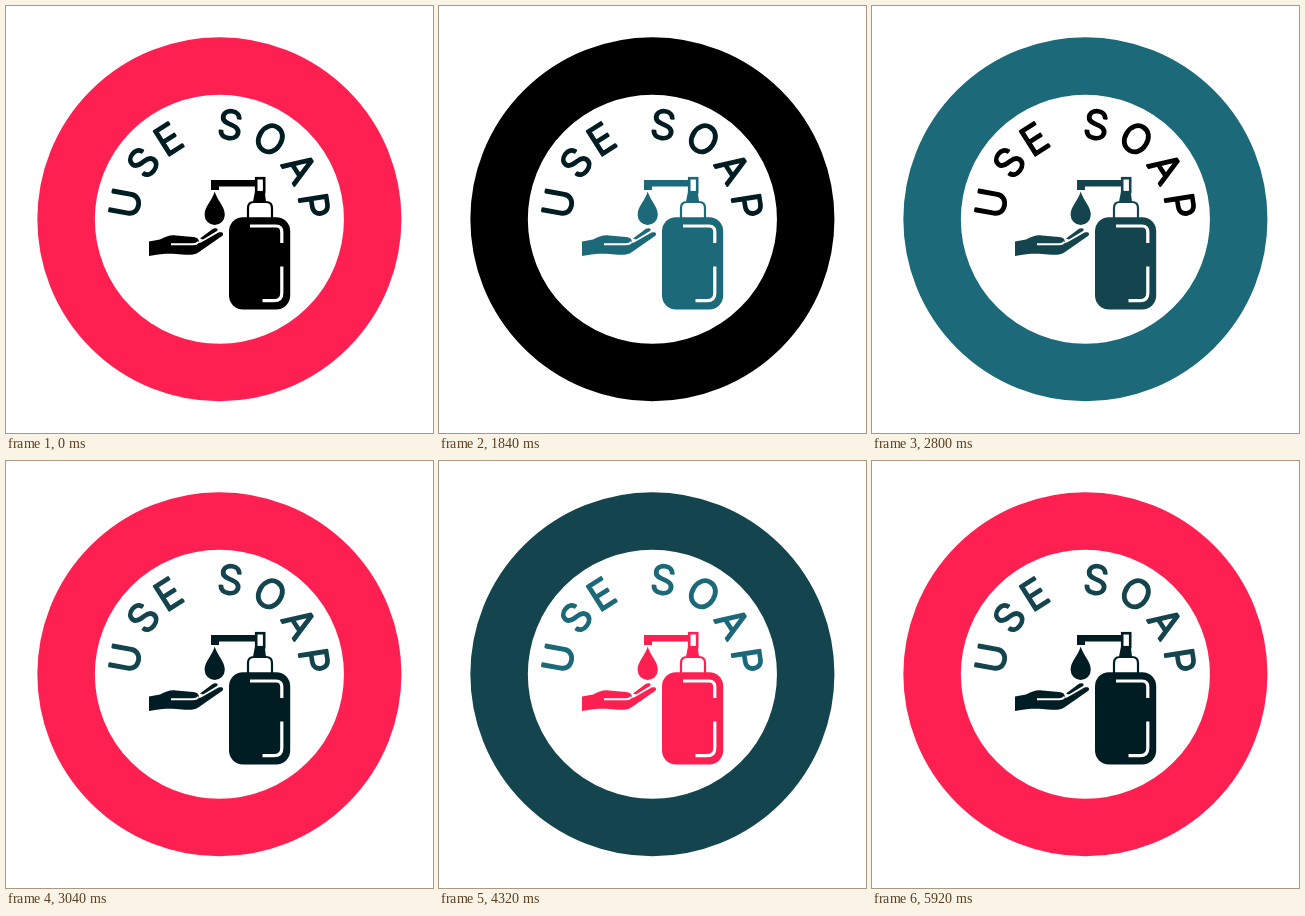
Recreate the animation shown at these times as an HTML page without scripts. Size 427 by 427 pixels, loop 6000 ms.

```html
<!DOCTYPE html>
<html lang="en">
<head>
<meta charset="utf-8">
<title>Use soap</title>
<style>
  html, body { margin: 0; width: 100%; height: 100%; overflow: hidden; background: #fff; }

  svg {
    --red: #ff2052;
    --navy: #001d23;
    --deep: #14454f;
    --teal: #1b6979;
    --black: #000;
    display: block;
    width: 100vw;
    height: 100vh;
    animation: palette 6s step-end infinite;
  }

  /* Five colour sets take turns after the opening one */
  @keyframes palette {
    0%           { --ring: var(--red);   --word: var(--navy);  --icon: var(--black); }
    9.6%, 57.6%  { --ring: var(--navy);  --word: var(--red);   --icon: var(--black); }
    19.2%, 67.2% { --ring: var(--deep);  --word: var(--teal);  --icon: var(--red); }
    28.8%, 76.8% { --ring: var(--black); --word: var(--navy);  --icon: var(--teal); }
    38.4%, 86.4% { --ring: var(--teal);  --word: var(--black); --icon: var(--deep); }
    48%, 96%, to { --ring: var(--red);   --word: var(--deep);  --icon: var(--navy); }
  }

  .ring { fill: none; stroke: var(--ring); stroke-width: 57.5; }

  .word {
    font: 300 39.5px Inter, "Open Sans", sans-serif;
    text-anchor: middle;
    fill: var(--word);
    stroke: var(--word);
    stroke-width: 2.2;
    stroke-linejoin: round;
  }

  .icon { fill: var(--icon); }
  .line { fill: none; stroke: var(--icon); }
  .shine { fill: none; stroke: #fff; stroke-width: 3.2; }
</style>
</head>
<body>
<svg viewBox="0 0 427 427">
  <circle class="ring" cx="213.4" cy="213.3" r="153.3"/>

  <g class="word" transform="translate(213.5 214)">
    <text y="-81.5" transform="rotate(-79.8)">U</text>
    <text y="-81.5" transform="rotate(-53)">S</text>
    <text y="-81.5" transform="rotate(-32.3)">E</text>
    <text y="-81.5" transform="rotate(6.5)">S</text>
    <text y="-81.5" transform="rotate(32)">O</text>
    <text y="-81.5" transform="rotate(57)">A</text>
    <text y="-81.5" transform="rotate(81.3)">P</text>
  </g>

  <!-- Pump -->
  <path class="icon" d="M205 174H250V180.500H213V184H205Z"/>
  <rect class="line" x="250.2" y="172.2" width="8" height="14" stroke-width="2.6"/>
  <path class="icon" d="M249 186H259V188L260 195.500H247L248.500 188Z"/>
  <path class="line" stroke-width="2.2" d="M242 213V202Q242 196 248 196H260Q266 196 266 202V213"/>

  <!-- Bottle -->
  <rect class="icon" x="223" y="211.200" width="61.200" height="92.300" rx="14"/>
  <path class="shine" d="M244 220H270Q275.800 220 275.800 226V237"/>
  <path class="shine" d="M275.800 260.500V287Q275.800 294.700 268 294.700H256.500"/>

  <!-- Drop -->
  <path class="icon" d="M208.700 185.500C211 194 218.800 200.500 218.800 208.800A10.100 10.100 0 0 1 198.600 208.800C198.600 200.500 206.500 194 208.700 185.500Z"/>

  <!-- Hand -->
  <path class="icon" d="M143 235.500L154 233.500C160 230.500 164 228.800 170 229.500L187 231C192 231.500 193.500 234 192.500 237L195 236.500L212.500 226.600C216.500 225 218.500 227.800 216 230L193 246C188 249.500 183 249 176 248.500C167 247.500 158 247 143 250Z"/>
  <path class="icon" d="M194 232.500L207 222.800C210 221.200 213 223 211 225L197 233.500Z"/>
  <path class="shine" style="stroke-width: 2" d="M165 238.200H187Q190.500 238.200 192.500 236"/>
</svg>
</body>
</html>
```
